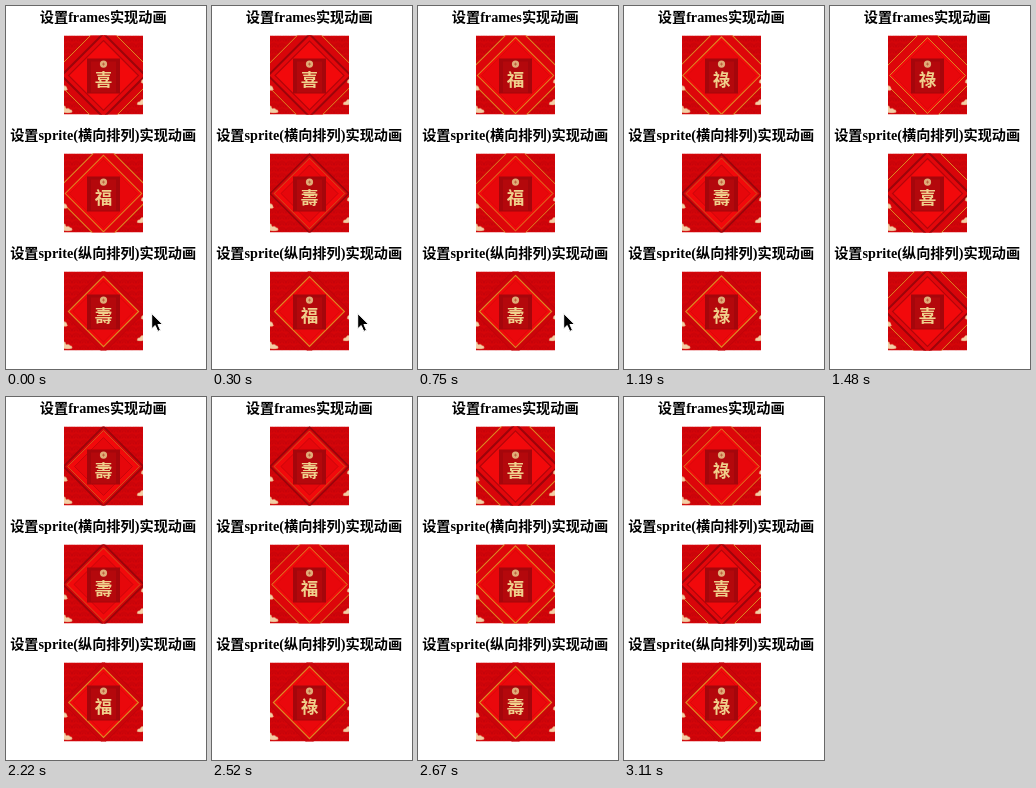
Write an HTML page that moves like this. It is 200x363 px and loops after 3210 ms.

```html
<!DOCTYPE html>
<html lang="zh-CN">
<head>
<meta charset="utf-8">
<style>
html, body { margin: 0; width: 100%; height: 100%; overflow: hidden; background: #fff; }
svg { display: block; width: 200px; height: 363px; }
.title { font: 700 14.2px "Liberation Serif", "Noto Sans CJK SC", "Noto Sans CJK", serif; text-anchor: middle; }
.han { font-family: "Noto Sans CJK SC", "Noto Sans CJK", sans-serif; }
.glyph { font: 900 17.5px "Noto Sans CJK TC", "Noto Sans CJK SC", "Noto Sans CJK", sans-serif; text-anchor: middle; fill: #f0d08c; }
</style>
</head>
<body>
<svg viewBox="0 0 200 363">
  <defs>
    <clipPath id="tile"><rect width="79" height="79"/></clipPath>
    <pattern id="scales" width="8" height="6" patternUnits="userSpaceOnUse">
      <path d="M0 6a4 4 0 0 1 8 0M2 6a2 2 0 0 1 4 0" fill="none" stroke="#b8000a" stroke-width=".6"/>
    </pattern>
    <g id="clouds" fill="#f3cfa6" stroke="#d9694a" stroke-width=".4">
      <path d="M-1 70q3 0 3 3q3-1 4 1q3 0 2 3q-4 1-9 0z"/>
      <path d="M-1 50q4 0 4 3q2 2-4 2z"/>
      <path d="M80 64q-3-1-4 2q-3 0-3 3q3 1 7 0z"/>
      <path d="M80 43q-3 1-3 4q1 1 3 1z"/>
    </g>
    <g id="plaque">
      <rect x="23" y="23" width="33" height="35" fill="#a5060b"/>
      <rect x="27" y="26" width="25" height="31" fill="#b4080c"/>
      <circle cx="39.5" cy="28.6" r="3.6" fill="#e0ac78"/>
      <path d="M38 28.6h3M39.5 27.1v3" stroke="#bd5638" stroke-width=".8"/>
    </g>
  </defs>
  <g id="rows"></g>
  <path id="cursor" d="M145.7 307.5v15.3l3.5-3.3 2.6 5.9 2.7-1.2-2.6-5.7h4.8z" fill="#000" stroke="#fff" stroke-width="1"/>
</svg>
<script>
const LOOP = 3210;
const TIMES = [0, 150, 300, 450, 600, 750, 890, 1040, 1190, 1340, 1480,
  1630, 1780, 1930, 2080, 2220, 2370, 2520, 2670, 2820, 2960, 3110];
const CHARS = '喜福祿壽';
const GOLD = '#dc8c24', DARK = '#9c040a', BRIGHT = '#f2090b', RED = '#d40509';

// Nested diamonds per card design: [radius, fill, stroke, stroke width]
const CARDS = {
  a: [[50, '#dd060a', GOLD, 1], [38, BRIGHT, GOLD, 1], [34, '#e8070b', '#cf070b', .6]],
  b: [[42, '#cb040a', '#bd040a', .8], [35.5, BRIGHT, GOLD, 1.1], [31, '#ea080c', '#cd080b', .6]],
  c: [[40, '#d5050a', DARK, 1.8], [36, BRIGHT, '#cf6a20', .8], [29, '#e6070b', '#bf060b', .8]],
  d: [[53, '#d8050a', GOLD, 1], [42, '#e3070b', DARK, 2], [35, BRIGHT, '#b2050a', 1.2]]
};
// cards: one design for each of CHARS; period in ms, phase in turns
const ROWS = [
  { title: ['设置', 'frames', '实现动画'], cards: 'daac', period: 329, phase: .12 },
  { title: ['设置', 'sprite(', '横向排列', ')', '实现动画'], cards: 'daac', period: 867, phase: .416 },
  { title: ['设置', 'sprite(', '纵向排列', ')', '实现动画'], cards: 'dbbb', period: 643, phase: .81 }
];

const diamond = ([r, fill, stroke, width]) =>
  `<path d="M0 ${-r}l${r} ${r}l${-r} ${r}l${-r} ${-r}z" fill="${fill}" stroke="${stroke}" stroke-width="${width}"/>`;

const titleSpans = parts => parts.map(p =>
  /[a-z()]/.test(p) ? p : `<tspan class="han">${p}</tspan>`).join('');

const cardMarkup = name => `<g data-card="${name}">${CARDS[name].map(diamond).join('')}</g>`;

const root = document.getElementById('rows');
root.innerHTML = ROWS.map((row, i) => `
  <text class="title" x="97.2" y="${16 + i * 118}">${titleSpans(row.title)}</text>
  <g class="card" transform="translate(58 ${29.5 + i * 118})" clip-path="url(#tile)">
    <rect width="79" height="79" fill="${RED}"/>
    <rect width="79" height="79" fill="url(#scales)"/>
    <g class="zoom">${Object.keys(CARDS).map(cardMarkup).join('')}</g>
    <use href="#clouds"/><use href="#plaque"/>
    <text class="glyph" x="39.5" y="50"></text>
  </g>`).join('');

const views = [...root.querySelectorAll('.card')].map(el => ({
  zoom: el.querySelector('.zoom'),
  cards: [...el.querySelectorAll('[data-card]')],
  glyph: el.querySelector('.glyph')
}));
const cursor = document.getElementById('cursor');
let shown = -1;

function show(step) {
  views.forEach(({ zoom, cards, glyph }, i) => {
    const row = ROWS[i];
    const pos = (row.phase + TIMES[step] / row.period) % 1 * CHARS.length;
    const index = Math.floor(pos);
    glyph.textContent = CHARS[index];
    zoom.setAttribute('transform', `translate(39.5 40) scale(${.98 + .04 * (pos - index)})`);
    for (const c of cards) c.style.display = c.dataset.card === row.cards[index] ? '' : 'none';
  });
  cursor.style.opacity = step < 6 ? 1 : step === 6 ? .5 : 0;
}

function tick() {
  const t = performance.now() % LOOP;
  const step = TIMES.findLastIndex(start => start <= t);
  if (step !== shown) show(shown = step);
  requestAnimationFrame(tick);
}
tick();
</script>
</body>
</html>
```
